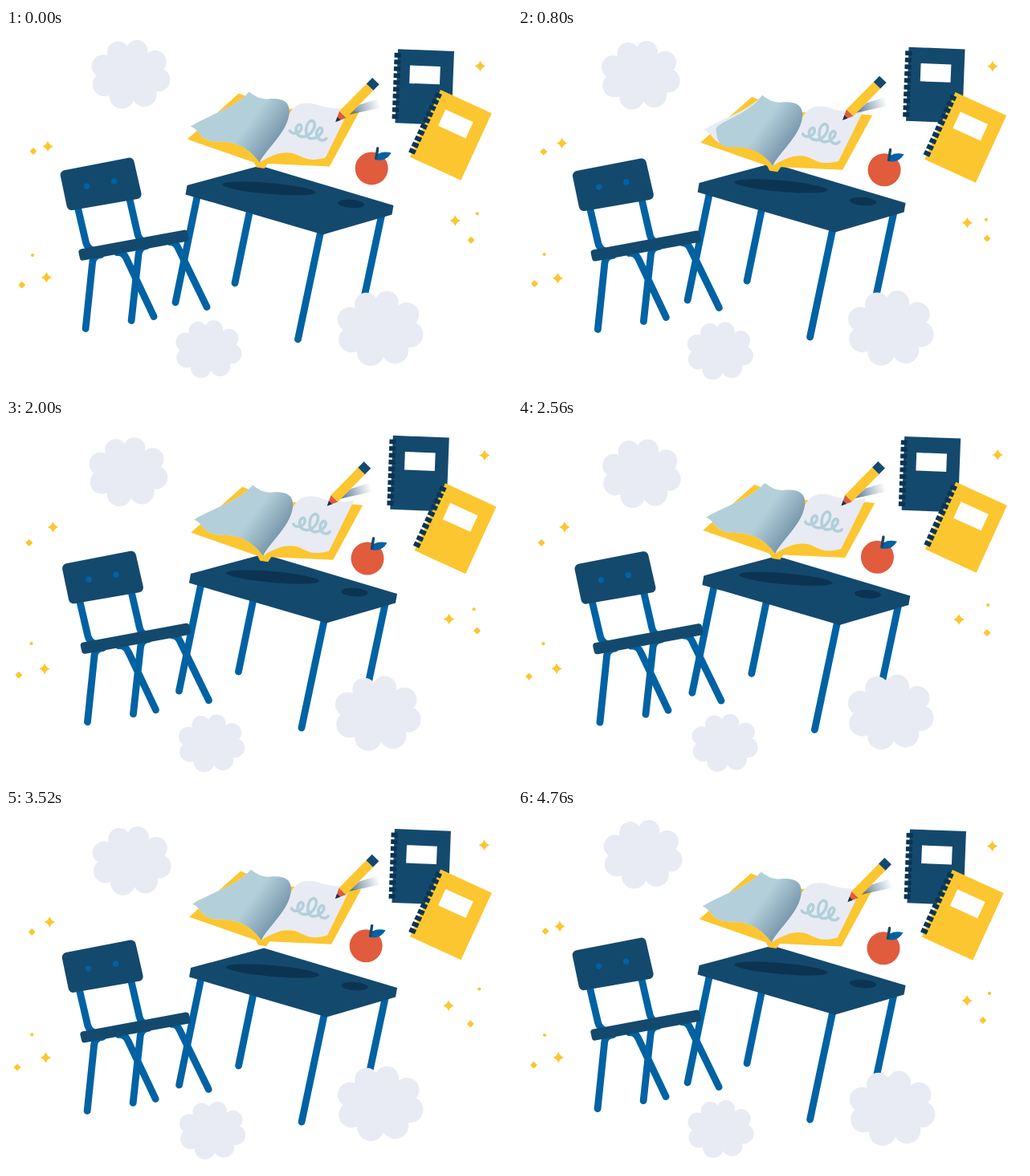
An HTML page for the animation above (4800 ms loop, 630 by 451 pixels).

```html
<!DOCTYPE html>
<html lang="en">
<head>
<meta charset="utf-8">
<title>Floating classroom</title>
<style>
  html, body { margin: 0; width: 100%; height: 100%; overflow: hidden; background: #fff; }
  svg { display: block; width: 100%; height: 100%; }
  .navy { fill: #14496e; }
  .dark { fill: #0c3452; }
  .blue { fill: #0062a3; }
  .yellow { fill: #fcc630; }
  .pale { fill: #e8ebf3; }
  .red { fill: #e05c3d; }
  .white { fill: #fff; }
  .legs { fill: none; stroke: #0062a3; stroke-width: 8.8; stroke-linecap: round; stroke-linejoin: round; }
</style>
</head>
<body>
<svg viewBox="0 0 630 451">
  <defs>
    <linearGradient id="curl" gradientUnits="userSpaceOnUse" x1="300" y1="121" x2="336" y2="147">
      <stop offset="0" stop-color="#b3cfda"/>
      <stop offset="1" stop-color="#7493a8"/>
    </linearGradient>
    <linearGradient id="fade" gradientUnits="userSpaceOnUse" x1="430" y1="107" x2="466" y2="95">
      <stop offset="0" stop-color="#3f6482" stop-opacity=".85"/>
      <stop offset="1" stop-color="#5d7f98" stop-opacity="0"/>
    </linearGradient>
    <g id="cloud" class="pale"></g>
    <path id="star" class="yellow" d="M0-7Q1.7-1.7 7 0Q1.7 1.7 0 7Q-1.7 1.7-7 0Q-1.7-1.7 0-7Z"/>
    <rect id="gem" class="yellow" x="-3.2" y="-3.2" width="6.4" height="6.4" rx=".8" transform="rotate(45)"/>
    <circle id="dot" class="yellow" r="2.1"/>
    <g id="pad">
      <rect width="70" height="92"/>
      <rect class="white" x="15.8" y="19.6" width="37.8" height="22.4"/>
      <path d="M0 4.700V87" fill="none" stroke="#0c3452" stroke-width="8.200" stroke-dasharray="5.800 2.700"/>
    </g>
  </defs>

  <!-- data-at: centre of the drift; data-swing: cosine x y, sine x y -->
  <use href="#star" data-at="593.7 46.9" data-swing="-3.3 .7 -1.3 .5"/>
  <use href="#star" data-at="55.2 141.5" data-swing="-3.1 5.9 1.2 -1"/>
  <use href="#gem" data-at="31.5 154.5" data-swing="2.5 -1 -1 .1"/>
  <use href="#star" data-at="49.2 311.6" data-swing="1.2 -.8 -.3 .6"/>
  <use href="#dot" data-at="32.3 282" data-swing=".8 1 0 -.5"/>
  <use href="#gem" data-at="17 320.8" data-swing="2.8 -.7 2.7 -2.3"/>
  <use href="#star" data-at="554.4 245.6" data-swing="4.9 -5.6 2.9 0"/>
  <use href="#dot" data-at="585.500 233" data-swing="1.2 -1.7 -3.8 7.7"/>
  <use href="#gem" data-at="582 265.6" data-swing="-2.9 -1.3 4 -3.3"/>

  <g data-at="104.2 20.6" data-swing="1 -5.6 -2.4 -2"><use href="#cloud"/></g>
  <g data-at="212.7 366.7" data-swing="-2.5 -2.5 -2 1.1"><use href="#cloud" transform="scale(.84)"/></g>

  <g data-at="3.3 -.2" data-swing="-2.8 .1 -1.5 -3.3">
    <path class="legs" d="M238 208 210.5 342M303 228 284.5 318M391 255 363 388M467 234 442 352"/>
    <path class="navy" d="M316 171.5 482 221 480 232.5 394 257.5 223 207.5 225 196Z"/>
    <ellipse class="dark" cx="327" cy="200" rx="58.3" ry="7" transform="rotate(5 327 200)"/>
    <ellipse class="dark" cx="429" cy="219" rx="16.6" ry="5.2" transform="rotate(4 429 219)"/>
  </g>

  <g data-at="410.2 324" data-swing="1.1 3.8 -1.4 1.8"><use href="#cloud" transform="scale(1.09)"/></g>

  <g data-at="1.5 2.9" data-swing="-1.4 -2.3 -.5 -.3">
    <path class="legs" d="M89 222 99.5 267Q101 273 107 276M153 209 164 257Q165.5 263 172 266"/>
    <path class="legs" d="M118 282Q108 283 107.5 292L99 374M138 279Q146 278 150 287L184 359M175 271Q166 272 165 281L156 364M204 266Q211 266 214 273L250 347"/>
    <g class="navy" stroke="#14496e" stroke-linejoin="round">
      <path stroke-width="12" d="M73.6 182.5 153.5 167 162.5 206.5 81.5 220.5Z"/>
      <path stroke-width="8" d="M94.3 278.7 222 255 223.5 261.5 95.7 285Z"/>
    </g>
    <circle class="blue" cx="100.5" cy="196.5" r="3.7"/>
    <circle class="blue" cx="134.4" cy="190.5" r="3.7"/>
  </g>

  <g data-at="2.1 1.7" data-swing="-2.3 -1.1 .3 4.1">
    <path class="yellow" d="M226 138 290 81 340 100 410 101 440 104 403 172 326 168.500 322 174.500 312 173 309 167Z"/>
    <path class="pale" d="M316 167C322 152 345 130 352 108C360 92 374 90 390 96C404 100 415 101 429 98L398 161C386 164 378 165 366 159C352 151 336 154 316 167Z"/>
    <path class="pale" d="M230 122C248 110 286 99 303 79L316 167C300 146 285 141 262 141C240 140 242 126 230 122Z"/>
    <path id="page" fill="url(#curl)"/>
    <path fill="none" stroke="#b3cfda" stroke-width="3.6" stroke-linecap="round"
      d="M353.5 127.5C356 133 369 131 368 122C366 116 360 123 361.5 128C363 136 373 137 379 131C386 124 386 114 380 115C373 117 371 135 379 137C386 138 394 132 394 126C392 120 386 127 387 133C389 140 396 141 399 137"/>
  </g>

  <g data-at="-5.1 -4.9" data-swing="4.4 4 -4.5 -.3">
    <path fill="url(#fade)" d="M425 110 441 96.5 465 89 466 100.5 430 108.5Z"/>
    <g transform="translate(411 118) rotate(-45.5)">
      <path class="red" d="M0 0 13-6V6Z"/>
      <path class="dark" d="M0 0 6-2.8V2.8Z"/>
      <path class="yellow" d="M13-6H61V6H13Z"/>
      <path class="navy" d="M61-6H71.500V6H61Z"/>
    </g>
  </g>

  <g data-at="-3.9 -1.2" data-swing="3.6 .6 3.1 2.5">
    <circle class="red" cx="455.5" cy="175.5" r="20.5"/>
    <path class="blue" d="M459.5 164.5Q463 152 480 156Q473 168 459.5 164.5Z"/>
    <path d="M463 150.5 461 163" fill="none" stroke="#14496e" stroke-width="3.4" stroke-linecap="round"/>
  </g>

  <g data-at="484.6 24.4" data-swing="3.4 1.9 .3 -1.8">
    <use href="#pad" class="navy" transform="rotate(2.2)"/>
  </g>
  <g data-at="543.5 78.7" data-swing="-2.4 -1.7 2.6 2.4">
    <use href="#pad" class="yellow" transform="rotate(24.6)"/>
  </g>
</svg>
<script>
const LOOP = 4800, STEP = 40, TURN = 2 * Math.PI;
const SVG = 'http://www.w3.org/2000/svg';
const numbers = text => text.split(' ').map(Number);

// A cloud is an oval with eight lobes round it, the lower ones larger.
const cloud = document.getElementById('cloud');
function addOval(cx, cy, rx, ry) {
  const oval = document.createElementNS(SVG, 'ellipse');
  Object.entries({ cx, cy, rx, ry }).forEach(([k, v]) => oval.setAttribute(k, v.toFixed(2)));
  cloud.append(oval);
}
addOval(49.6, 42, 37, 31);
for (let i = 0; i < 8; i++) {
  const a = (i * 46 - 77) * TURN / 360;
  const r = 14.5 + Math.sin(a);
  addOval(49.6 + 36 * Math.cos(a), 42 + 29.3 * Math.sin(a), r, r);
}

// Everything drifts round its own small ellipse, once per loop.
const drifters = [...document.querySelectorAll('[data-swing]')].map(el => ({
  el, at: numbers(el.dataset.at), swing: numbers(el.dataset.swing)
}));

// The loose edge of the left page curls up as lift goes from 0 to 1.
const page = document.getElementById('page');
function pagePath(lift) {
  const mix = (a, b) => (a + (b - a) * lift).toFixed(2);
  const tip = `${mix(230, 246)} ${mix(122, 121)}`;
  return `M${tip}C${mix(248, 247)} ${mix(110, 112)} ${mix(286, 285)} ${mix(99, 104)} 303 79` +
    'C312 86 318 88 326 88C342 86 353 90 353 103C353 128 322 152 316 167' +
    `C300 146 285 ${mix(141, 144)} 262 ${mix(141, 144)}` +
    `C${mix(240, 246)} ${mix(140, 143)} ${mix(242, 246)} ${mix(126, 127)} ${tip}Z`;
}

function draw(now) {
  const t = Math.floor(now % LOOP / STEP) * STEP;
  const cos = Math.cos(TURN * t / LOOP), sin = Math.sin(TURN * t / LOOP);
  for (const { el, at, swing } of drifters) {
    const x = at[0] + swing[0] * cos + swing[2] * sin;
    const y = at[1] + swing[1] * cos + swing[3] * sin;
    el.setAttribute('transform', `translate(${x.toFixed(2)} ${y.toFixed(2)})`);
  }
  const phase = Math.min(1, Math.max(0, (t - 100) / 1600));
  page.setAttribute('d', pagePath(Math.sin(Math.PI * phase) ** 2));
}

const start = performance.now();
function tick() {
  draw(performance.now() - start);
  requestAnimationFrame(tick);
}
tick();
</script>
</body>
</html>
```
